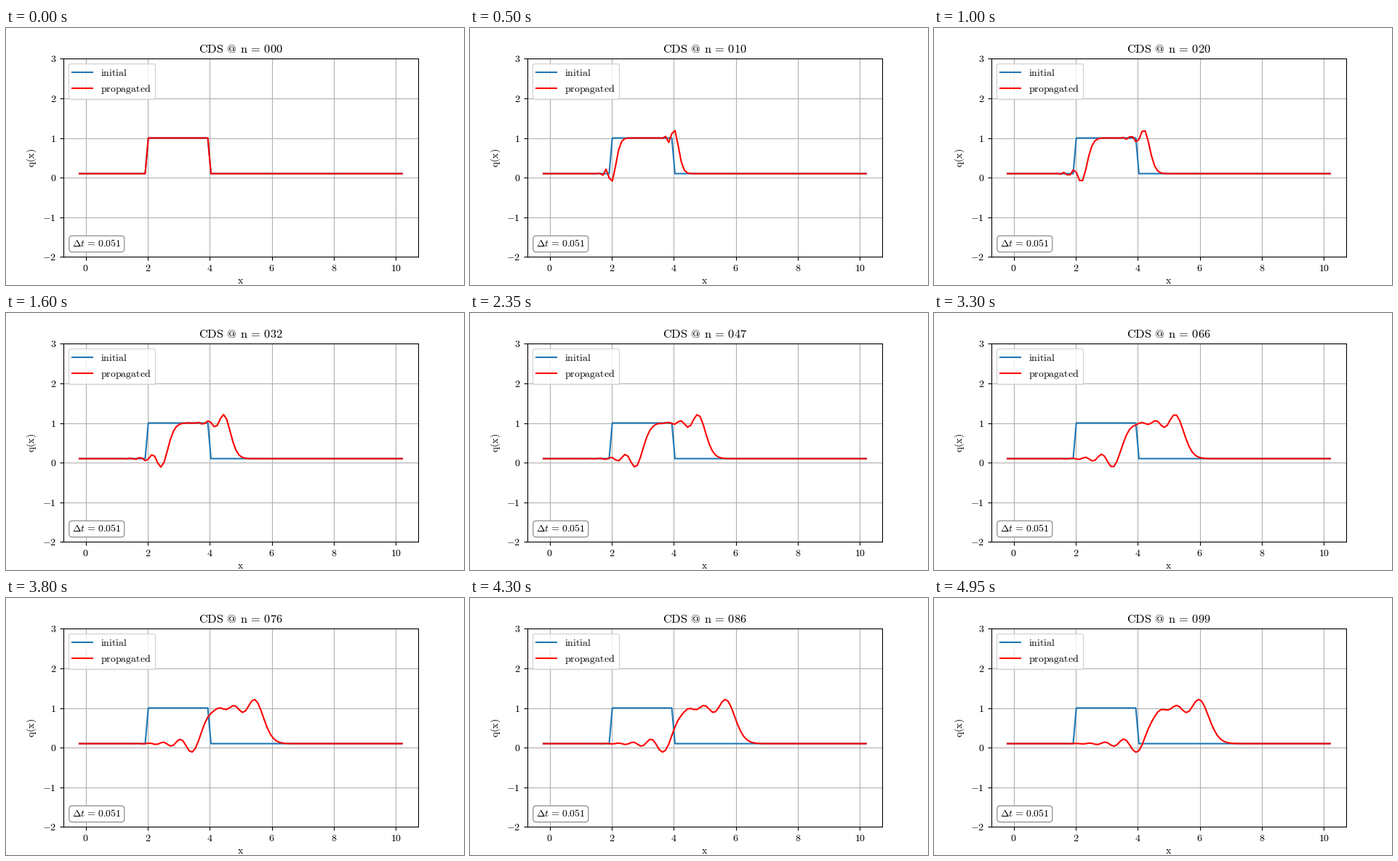
A matplotlib script that plays this animation: 630x354 px, repeating every 5 s.

```python
import numpy as np
import matplotlib.pyplot as plt
from matplotlib.animation import FuncAnimation

plt.rcParams.update({
    "font.family": "Liberation Serif",
    "mathtext.fontset": "cm",
    "font.size": 10,
})

STEPS = 100
SPEED = 0.5
DX = 10 / 99
DT = 0.5 * DX
C = SPEED * DT / DX
SPACE = r"\hspace{0.38}"
EQUALS = r"\hspace{0.18}=\hspace{0.18}"


def roman(text):
    """Typeset plain text in upright Computer Modern."""
    text = text.replace(" = ", EQUALS).replace(" ", SPACE)
    return r"$\mathrm{" + text + "}$"


def advance(q):
    """One second-order central step for linear advection."""
    left, right = np.roll(q, 1), np.roll(q, -1)
    return q - C / 2 * (right - left) + C**2 / 2 * (right - 2 * q + left)


# Grid on [0, 10] with two ghost points on each side
x = np.arange(-2, 102) * DX
states = [np.where((x > 2) & (x < 4), 1.0, 0.1)]
for _ in range(STEPS - 1):
    states.append(advance(states[-1]))

fig, ax = plt.subplots(figsize=(6.3, 3.54), dpi=100)
fig.subplots_adjust(left=0.125, right=0.9, bottom=0.11, top=0.88)

ax.plot(x, states[0], label=roman("initial"))
wave, = ax.plot(x, states[0], color="red", label=roman("propagated"))

ax.set_xlim(x[0] - 0.05 * np.ptp(x), x[-1] + 0.05 * np.ptp(x))
ax.set_ylim(-2, 3)
ax.set_xticks(range(0, 11, 2))
ax.set_yticks(range(-2, 4))
for axis in (ax.xaxis, ax.yaxis):
    axis.set_major_formatter(lambda v, pos: f"${v:g}$")
ax.grid(True, color="#b0b0b0", linewidth=0.8)
ax.set_xlabel(roman("x"), labelpad=3.2)
ax.set_ylabel(roman("q(x)"))
title = ax.set_title("", fontsize=11.8)
ax.legend(loc="upper left", prop={"family": "DejaVu Sans", "size": 10})
ax.text(0.025, 0.05,
        rf"$\Delta t\hspace{{0.117}}=\hspace{{0.117}}{DT:.3f}$",
        transform=ax.transAxes,
        bbox=dict(boxstyle="round", facecolor="white",
                  edgecolor="gray", linewidth=0.8))


def update(n):
    wave.set_ydata(states[n])
    title.set_text(roman(f"CDS @ n = {n:03d}"))
    return wave, title


update(0)
anim = FuncAnimation(fig, update, frames=STEPS, interval=50,
                     repeat=True, repeat_delay=0)
plt.show()
```
